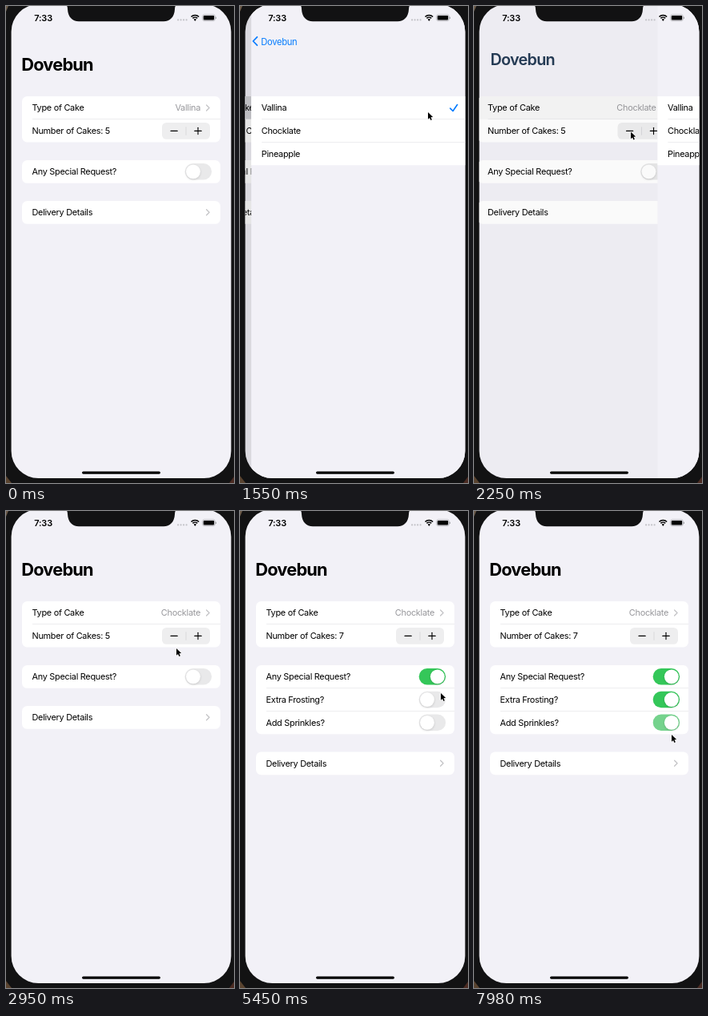
Write an HTML page with a canvas that moves like this. It is 285x597 px and loops after 8 s.

```html
<!DOCTYPE html>
<html lang="en">
<head>
<meta charset="utf-8">
<title>Order form</title>
<style>
html, body { margin: 0; width: 100%; height: 100%; overflow: hidden; background: #111; }
canvas { display: block; width: 285px; height: 597px; }
</style>
</head>
<body>
<canvas id="stage"></canvas>
<script>
const W = 285, H = 597, LOOP = 8000;
const LEFT = 7, RIGHT = 281, SPAN = RIGHT - LEFT;
const TITLE = 'Dovebun';
const BG = '#f2f1f7', LINE = '#e5e5e8', BLUE = '#007aff', BEZEL = '#121213';
const canvas = document.getElementById('stage');
const ctx = canvas.getContext('2d');
const ratio = window.devicePixelRatio || 1;
canvas.width = W * ratio;
canvas.height = H * ratio;

const clamp = v => Math.max(0, Math.min(1, v));
const mix = (a, b, p) => a + (b - a) * p;
const smooth = p => p * p * (3 - 2 * p);
const ease = (t, start, length) => smooth(clamp((t - start) / length));

// Critically damped spring
function spring(t, start) {
  const x = Math.max(0, t - start) * 0.0183;
  return x > 12 ? 1 : 1 - (1 + x) * Math.exp(-x);
}

// Pointer path: time, x, y
const PATH = [
  [150, 279.5, 110.5], [300, 279.5, 110.5], [800, 241, 131], [1050, 241, 131],
  [1300, 240.5, 130.5], [1550, 235, 133], [1850, 196, 157], [2250, 196, 157.5],
  [2750, 194, 176], [2950, 213, 172], [3250, 236.5, 157.5], [4400, 236.5, 157.5],
  [4750, 252, 209], [5200, 252, 209], [5450, 251, 228], [5850, 249, 240],
  [6200, 249, 240], [6950, 250, 280], [7200, 234, 253], [7420, 248, 228],
  [7650, 255, 245], [7800, 255, 245], [7980, 247, 280], [8000, 247, 280]
];

function text(str, x, y, o = {}) {
  const { size = 10.9, weight = 400, color = '#000', align = 'left', track = -0.28 } = o;
  ctx.font = `${weight} ${size}px Inter, sans-serif`;
  ctx.letterSpacing = track + 'px';
  ctx.textAlign = align;
  ctx.fillStyle = color;
  ctx.fillText(str, x, y);
}

function box(x, y, w, h, r, color) {
  ctx.fillStyle = color;
  ctx.beginPath();
  ctx.roundRect(x, y, w, h, r);
  ctx.fill();
}

function rect(x, y, w, h, color) {
  ctx.fillStyle = color;
  ctx.fillRect(x, y, w, h);
}

function stroke(points, color, width) {
  ctx.strokeStyle = color;
  ctx.lineWidth = width;
  ctx.lineCap = ctx.lineJoin = 'round';
  ctx.beginPath();
  points.forEach(([x, y]) => ctx.lineTo(x, y));
  ctx.stroke();
}

function poly(points, color) {
  ctx.fillStyle = color;
  ctx.beginPath();
  points.forEach(([x, y]) => ctx.lineTo(x, y));
  ctx.fill();
}

function faded(alpha, draw) {
  if (alpha <= 0) return;
  ctx.save();
  ctx.globalAlpha *= alpha;
  draw();
  ctx.restore();
}

function chevron(y) {
  stroke([[250.6, y - 3.5], [254.1, y], [250.6, y + 3.5]], '#c4c4c7', 1.3);
}

function toggle(y, t, tap) {
  const on = ease(t, tap, 220), slide = ease(t, tap, 130);
  const color = [[233, 52], [233, 199], [234, 89]].map(([a, b]) => Math.round(mix(a, b, on)));
  box(223.7, y - 10.2, 33.4, 20.4, 10.2, `rgb(${color})`);
  ctx.save();
  ctx.shadowColor = 'rgba(0,0,0,.15)';
  ctx.shadowBlur = 3 * ratio;
  ctx.shadowOffsetY = ratio;
  box(mix(225, 237.9, slide), y - 8.9, 17.9, 17.9, 8.95, '#fff');
  ctx.restore();
}

function stepper(t) {
  box(195, 146, 60, 20.8, 5.5, '#eeeeef');
  rect(224.6, 151.3, 0.8, 10.4, '#d3d3d6');
  const press = (down, up) => t < down ? 0 : 1 - ease(t, up, 150);
  faded(Math.max(press(3500, 3600), press(3950, 4100)), () =>
    box(225, 146, 30, 20.8, [0, 5.5, 5.5, 0], '#d6d6d9'));
  stroke([[206, 156.4], [214.2, 156.4]], '#000', 1.1);
  stroke([[235.8, 156.4], [244.2, 156.4]], '#000', 1.1);
  stroke([[240, 152.2], [240, 160.6]], '#000', 1.1);
}

function orderGroup(t, push) {
  box(20, 113, 248, 57.5, 6.5, '#fff');
  const lit = t < 1050 ? 0 : t < 2000 ? 1 : push;
  faded(lit, () => box(20, 113, 248, 28.7, [6.5, 6.5, 0, 0], '#d1d1d6'));
  rect(33, 141.3, 235, 0.7, LINE);
  text('Type of Cake', 32.5, 131.2);
  text(t < 2000 ? 'Vallina' : 'Chocklate', 243, 131.2, { color: '#97979b', align: 'right' });
  chevron(127.5);
  const count = t < 3600 ? 5 : t < 4100 ? 6 : 7;
  text('Number of Cakes: ' + count, 32.5, 160.1);
  stepper(t);
}

function requestGroup(t, open) {
  ctx.save();
  ctx.beginPath();
  ctx.roundRect(20, 193, 248, 28.8 + open * 57.4, 6.5);
  ctx.fillStyle = '#fff';
  ctx.fill();
  ctx.clip();
  text('Any Special Request?', 32.5, 211.2);
  toggle(207.3, t, 4850);
  faded(open, () => {
    rect(33, 221.4, 235, 0.7, LINE);
    rect(33, 250.1, 235, 0.7, LINE);
    text('Extra Frosting?', 32.5, 239.9);
    text('Add Sprinkles?', 32.5, 268.6);
    toggle(236, t, 6150);
    toggle(264.8, t, 7850);
  });
  ctx.restore();
}

function form(t, push) {
  const open = ease(t, 4900, 300);
  rect(-100, -5, 500, 610, BG);
  orderGroup(t, push);
  requestGroup(t, open);
  const y = 244 + open * 57.4;
  box(20, y, 248, 28.8, 6.5, '#fff');
  text('Delivery Details', 32.5, y + 18.2);
  chevron(y + 14.3);
}

function choices(t) {
  rect(LEFT, -5, SPAN, 610, BG);
  rect(LEFT, 113, SPAN, 86.2, '#fff');
  if (t >= 1950) {
    faded(1 - ease(t, 2050, 150), () => rect(LEFT, 141.7, SPAN, 28.7, '#d1d1d6'));
  }
  ['Vallina', 'Chocklate', 'Pineapple'].forEach((name, i) => {
    text(name, 19.6, 131.2 + i * 28.75);
    if (i) rect(20, 112.6 + i * 28.75, SPAN - 13, 0.7, LINE);
  });
  const y = t < 2000 ? 127.5 : 156.3;
  stroke([[255.7, y + 0.6], [259, y + 4], [264.5, y - 4]], BLUE, 1.6);
}

// Large title shrinks into the back button
function heading(push) {
  const x = mix(19.2, 26.4, push), y = mix(80.6, 48, push);
  const style = {
    size: mix(21.8, 10.9, push),
    weight: Math.round(mix(700, 400, push)),
    track: mix(-0.8, -0.28, push)
  };
  faded(1 - push, () => text(TITLE, x, y, style));
  faded(push, () => text(TITLE, x, y, { ...style, color: BLUE }));
  faded(clamp(push * 2 - 1), () =>
    stroke([[21.4, 38.8], [16.4, 44], [21.4, 49.2]], BLUE, 1.8));
}

function statusBar() {
  text('7:33', 35.3, 19, { weight: 600, size: 11, track: -0.2 });
  for (let i = 0; i < 4; i++) box(214 + i * 3.5, 16.3, 2.2, 2.2, 1.1, '#c3c3c8');
  ctx.strokeStyle = '#000';
  ctx.lineCap = 'butt';
  [[6.8, 1.7], [4.1, 1.6]].forEach(([r, w]) => {
    ctx.lineWidth = w;
    ctx.beginPath();
    ctx.arc(236.3, 18.3, r, -Math.PI * 0.75, -Math.PI * 0.25);
    ctx.stroke();
  });
  ctx.fillStyle = '#000';
  ctx.beginPath();
  ctx.moveTo(236.3, 18.9);
  ctx.arc(236.3, 18.5, 2.3, -Math.PI * 0.75, -Math.PI * 0.25);
  ctx.fill();
  ctx.strokeStyle = '#a3a3a7';
  ctx.lineWidth = 0.7;
  ctx.beginPath();
  ctx.roundRect(245.7, 10.8, 15.6, 7.8, 2.3);
  ctx.stroke();
  box(246.8, 11.9, 13.4, 5.6, 1.3, '#000');
  box(262, 13.4, 1, 2.6, 0.5, '#a3a3a7');
}

function notch() {
  ctx.fillStyle = BEZEL;
  ctx.beginPath();
  ctx.moveTo(74, -2);
  ctx.quadraticCurveTo(77, -1, 77, 4);
  ctx.bezierCurveTo(77.5, 14, 83, 19.2, 91, 19.2);
  ctx.lineTo(197, 19.2);
  ctx.bezierCurveTo(205, 19.2, 210.5, 14, 211, 4);
  ctx.quadraticCurveTo(211, -1, 214, -2);
  ctx.fill();
}

function pointer(t) {
  if (t < PATH[0][0]) return;
  const i = PATH.findIndex(p => p[0] > t);
  const [t0, x0, y0] = PATH[i - 1], [t1, x1, y1] = PATH[i];
  const p = smooth((t - t0) / (t1 - t0));
  ctx.save();
  ctx.translate(mix(x0, x1, p), mix(y0, y1, p));
  const arrow = [[0, 0], [0, 8.7], [2, 6.9], [3.4, 10], [4.9, 9.3], [3.5, 6.3], [6.2, 6.1], [0, 0]];
  stroke(arrow, '#fff', 1.2);
  poly(arrow, '#000');
  ctx.restore();
}

function draw(t) {
  ctx.setTransform(ratio, 0, 0, ratio, 0, 0);
  rect(0, 0, W, H, BEZEL);
  poly([[0, 0], [3, 0], [0, 7]], '#6b5a48');
  poly([[0, 588], [7, 597], [0, 597]], '#59432f');
  poly([[285, 589], [285, 597], [279, 597]], '#4b2b22');

  const push = t < 2083 ? spring(t, 1249) : 1 - spring(t, 2083);
  ctx.save();
  ctx.beginPath();
  ctx.roundRect(LEFT - 0.4, -2, SPAN + 0.8, 593, 34);
  ctx.clip();
  ctx.save();
  ctx.translate(-push * SPAN * 0.3, 0);
  form(t, push);
  ctx.restore();
  faded(push * 0.1, () => rect(0, 0, W, H, '#000'));
  if (push > 0) {
    ctx.save();
    ctx.translate((1 - push) * SPAN, 0);
    choices(t);
    ctx.restore();
  }
  heading(push);
  statusBar();
  box(95, 582.4, 98, 3.3, 1.65, '#000');
  ctx.restore();
  notch();
  pointer(t);
}

function tick(now) {
  draw(now % LOOP);
  requestAnimationFrame(tick);
}
draw(0);
requestAnimationFrame(tick);
</script>
</body>
</html>
```
